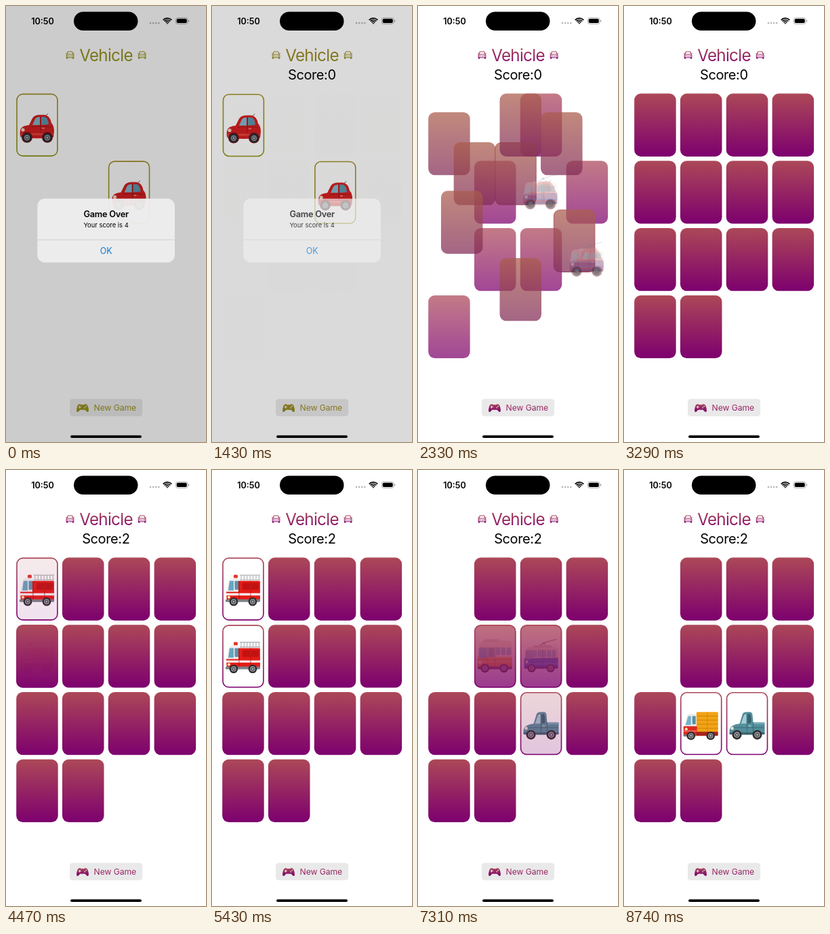
These frames come from a looping animation (295 px wide and 640 px high, 9650 ms). An HTML page with a canvas:

```html
<!DOCTYPE html>
<html lang="en">
<head>
<meta charset="utf-8">
<title>Vehicle memory game</title>
<style>
html, body { margin: 0; width: 100%; height: 100%; overflow: hidden; background: #fff; }
canvas { display: block; width: 295px; height: 640px; }
</style>
</head>
<body>
<canvas id="stage"></canvas>
<script>
const W = 295, H = 640, LOOP = 9650;
const canvas = document.getElementById('stage');
const ctx = canvas.getContext('2d');
const dpr = window.devicePixelRatio || 1;
canvas.width = W * dpr;
canvas.height = H * dpr;

const FONT = 'Inter, Roboto, "Liberation Sans", sans-serif';
const OLIVE = [[165, 144, 40], [140, 150, 22]];
const BERRY = [[172, 72, 88], [125, 0, 110]];
const CARD = { w: 61.5, h: 92.3, r: 9.5 };

const DEAL = 1380, DEAL_TIME = 1455, FLIP = 950;

// Cards carried over to the new game: from column, row to column, row
const MOVES = [
  [0, 1, 0, 0], [3, 0, 1, 0], [1, 1, 3, 0],
  [2, 0, 0, 1], [1, 0, 0, 2], [3, 1, 1, 3]
];
const CAR_MOVES = [[0, 0, 2, 1], [2, 1, 3, 2]];
const ADDED = [[2, 0], [1, 1], [3, 1], [1, 2], [2, 2], [0, 3]];

const FLIPS = {
  '0,0': { art: fireEngine, up: 3720, gone: 5460 },
  '0,1': { art: fireEngine, up: 4400, gone: 5460 },
  '1,1': { art: bus, up: 5460, down: 6655 },
  '2,1': { art: trolley, up: 5805, down: 6655 },
  '2,2': { art: pickup, up: 6655 },
  '1,2': { art: truck, up: 7760 }
};

const lerp = (a, b, p) => a + (b - a) * p;
const ramp = (t, start, len) => {
  const x = Math.min(1, Math.max(0, (t - start) / len));
  return x * x * (3 - 2 * x);
};
const colX = c => 15.2 + c * 67.8;
const rowY = r => 128.6 + r * 98.7;

function gradient(y, h, mix) {
  const g = ctx.createLinearGradient(0, y, 0, y + h);
  for (const i of [0, 1]) {
    const rgb = OLIVE[i].map((v, k) => Math.round(lerp(v, BERRY[i][k], mix)));
    g.addColorStop(i, `rgb(${rgb})`);
  }
  return g;
}

function box(x, y, w, h, r, fill) {
  ctx.beginPath();
  ctx.roundRect(x, y, w, h, r);
  ctx.fillStyle = fill;
  ctx.fill();
}

function poly(fill, ...pts) {
  ctx.beginPath();
  for (let i = 0; i < pts.length; i += 2) ctx.lineTo(pts[i], pts[i + 1]);
  ctx.closePath();
  ctx.fillStyle = fill;
  ctx.fill();
}

function shape(d, fill) {
  ctx.fillStyle = fill;
  ctx.fill(new Path2D(d));
}

function stroke(d, color, width) {
  ctx.strokeStyle = color;
  ctx.lineWidth = width;
  ctx.stroke(new Path2D(d));
}

function dot(x, y, r, fill) {
  ctx.beginPath();
  ctx.arc(x, y, r, 0, Math.PI * 2);
  ctx.fillStyle = fill;
  ctx.fill();
}

function text(str, x, y, size, fill, weight = 400, spacing = 0, align = 'center') {
  ctx.font = `${weight} ${size}px ${FONT}`;
  ctx.letterSpacing = spacing + 'px';
  ctx.textAlign = align;
  ctx.fillStyle = fill;
  ctx.fillText(str, x, y);
}

function faded(alpha, draw) {
  if (alpha <= 0) return;
  ctx.save();
  ctx.globalAlpha *= alpha;
  draw();
  ctx.restore();
}

function at(x, y, draw) {
  ctx.save();
  ctx.translate(x, y);
  draw();
  ctx.restore();
}

// Vehicles, drawn around the middle of a card

function wheels(y, r, ...xs) {
  for (const x of xs) {
    dot(x, y, r, '#2b2b2f');
    dot(x, y, r * 0.62, '#9a9da0');
    dot(x, y, r * 0.42, '#55595d');
    dot(x, y, r * 0.17, '#c9cccd');
  }
}

function redCar() {
  stroke('M12 -13 L16 -17', '#54454a', 1);
  shape('M-25 8 Q-24 1 -12 0 L-7 -10 Q-4 -15 4 -15 L11 -15 Q19 -14 21 -3 Q25 1 25 9 L24 18 Q0 21 -24 18 Q-26 16 -25 8Z', '#d51f20');
  shape('M-7 0 L-3 -9 Q-1 -12 4 -12 L4 0Z', '#86b9cc');
  shape('M6 -12 L11 -12 Q16 -11 17 -1 L6 0Z', '#5f97ad');
  stroke('M5 -13 V15 M-9 3 Q7 0 21 3', '#95151a', 0.8);
  box(-24, 12, 47, 3, 1.5, '#e9453d');
  box(7, 4, 4, 1.2, 0.6, '#eeb0a8');
  dot(-21, 7, 2.6, '#f5d9c4');
  box(-25, 16, 6, 2, 1, '#8d8f92');
  dot(-15, 18, 8, '#7e1218');
  dot(15, 18, 8, '#7e1218');
  wheels(18.5, 6.7, -15, 15);
}

function bus() {
  shape('M-24 -9 Q-24 -23 -15 -23 L20 -23 Q25 -22 25 -15 L25 2 L-26 2Z', '#eee5cc');
  box(-17, -25, 24, 4, 2, '#d9d0b8');
  shape('M-26 1 L25 1 L25 16 Q0 20 -26 16Z', '#f5a623');
  box(-26, 10, 51, 6, 2, '#e88a14');
  box(-24, -13, 12, 16, 2, '#63a8c5');
  box(-10, -13, 9, 14, 1.5, '#599cb9');
  for (const x of [1, 9, 17]) box(x, -13, 6.5, 11, 1, '#6fb2cd');
  stroke('M-11 -14 V15 M0 -14 V15 M-26 5 H25', '#b7730d', 0.8);
  dot(-22, 9, 2.2, '#fff2b8');
  box(-26, 15, 51, 4, 2, '#48484c');
  wheels(17.5, 6.5, -15, 13);
}

function trolley() {
  stroke('M-3 -15 L4 -20 L23 -25', '#6e6a6c', 1.1);
  stroke('M4 -20 L9 -15', '#6e6a6c', 0.8);
  dot(4, -19, 1.7, '#3b98c4');
  shape('M-23 -5 Q-23 -14 -17 -14 L19 -14 Q25 -13 25 -7 L25 5 L-25 5Z', '#e6dfcf');
  box(-12, -16, 28, 3, 1.5, '#cbc4b6');
  shape('M-25 3 L25 2 L25 16 Q0 20 -25 16Z', '#1e62c4');
  box(-25, 10, 50, 2, 1, '#3f8be0');
  box(-23, -9, 9, 13, 2, '#6cabc3');
  for (let x = -12; x < 20; x += 7) box(x, -9, 5.7, 10, 1, '#75b2c7');
  stroke('M-13 -10 V15 M2 -10 V15', '#15498f', 0.7);
  dot(-21, 8, 2, '#fff0c0');
  box(-25, 15, 50, 3, 1.5, '#253a68');
  wheels(17.5, 6, -14, 14);
}

function fireEngine() {
  stroke('M-5 -20.5 H25 M-5 -13.5 H25', '#a2a6aa', 1.2);
  for (let x = -3; x < 25; x += 4.4) stroke(`M${x} -20 V-14`, '#a2a6aa', 1);
  box(-14, -21, 6, 5, 1.5, '#e0382d');
  shape('M-23 -6 Q-21 -16 -17 -16 L-6 -16 L-6 9 L-25 9Z', '#f0f0ef');
  shape('M-22 2 L-20 -12 L-14 -12 L-14 2Z', '#68a5c1');
  box(-12.5, -12, 6, 13, 1, '#5a93ad');
  box(-7, -12, 32, 30, 1.5, '#e51b17');
  shape('M-25 4 L-6 4 L-6 18 L-24 18Z', '#e51b17');
  box(-1, -9, 11, 10, 1, '#c11212');
  box(12, -9, 11, 10, 1, '#c11212');
  box(-25, 6, 50, 3.4, 0, '#f5efee');
  stroke('M-6 -12 V16 M11 -12 V16', '#a01010', 0.7);
  dot(-21, 12, 2, '#ffe7a0');
  box(-26, 15, 51, 4, 1.5, '#7d8286');
  wheels(18.5, 6.3, -14, 14);
}

function pickup() {
  shape('M-26 9 Q-25 2 -11 0 L-7 -13 Q-6 -17 -1 -17 L5 -17 Q8 -16 8 -12 L9 -1 L26 -1 L26 15 Q0 18 -26 15Z', '#548f9c');
  shape('M-9 0 L-5 -11 Q-4 -14 -1 -14 L-1 0Z', '#a6cdd5');
  shape('M1 -14 L4 -14 Q6 -13 6 -1 L1 0Z', '#33616d');
  box(9, -2, 17, 3, 1, '#75acb6');
  stroke('M0 -14 V14 M9 -2 V14 M-24 6 H25', '#33626d', 0.8);
  box(2, 3, 4, 1.2, 0.6, '#c2dde1');
  dot(-22, 7, 2.3, '#e8e1c4');
  box(-26, 13, 52, 3, 1.5, '#3f626b');
  wheels(16.5, 7, -15, 15);
}

function truck() {
  box(-7, -17, 32, 30, 1.5, '#f3a315');
  for (let y = -11; y < 12; y += 6) stroke(`M-6 ${y} H25`, '#c77e0c', 0.9);
  stroke('M9 -17 V13', '#d08a0e', 0.8);
  shape('M-24 3 L-21 -11 Q-20 -14 -17 -14 L-7 -14 L-7 5 L-26 5Z', '#e9eae8');
  shape('M-23 2 L-19 -11 L-15 -11 L-15 2Z', '#74b0c9');
  box(-13, -11, 5, 12, 1, '#568fa8');
  shape('M-26 4 L-6 4 L-6 18 L-26 18Z', '#dc2a21');
  box(-7, 12, 32, 6, 1, '#a9231d');
  box(-26, 10, 20, 2, 1, '#ef6a5c');
  dot(-22, 8, 2, '#fff0bb');
  box(-26, 16, 18, 3, 1, '#74777b');
  wheels(18, 6.2, -15, 14);
}

// Cards

function back(x, y, mix = 1) {
  box(x, y, CARD.w, CARD.h, CARD.r, gradient(y, CARD.h, mix));
}

function face(x, y, mix, fillAlpha = 1) {
  faded(fillAlpha, () => box(x, y, CARD.w, CARD.h, CARD.r, '#fff'));
  ctx.beginPath();
  ctx.roundRect(x + 0.8, y + 0.8, CARD.w - 1.6, CARD.h - 1.6, CARD.r - 0.8);
  ctx.strokeStyle = gradient(y, CARD.h, mix);
  ctx.lineWidth = 1.6;
  ctx.stroke();
}

const inCard = (x, y, art) => at(x + CARD.w / 2, y + CARD.h / 2, art);

function dealing(t) {
  const p = ramp(t, DEAL, DEAL_TIME);
  const q = ramp(t, DEAL, 1000);
  const place = ([c0, r0, c1, r1], k) =>
    [lerp(colX(c0), colX(c1), k), lerp(rowY(r0), rowY(r1), k)];

  for (const [c, r] of ADDED) faded(p, () => back(colX(c), rowY(r)));
  for (const m of CAR_MOVES) {
    const [x, y] = place(m, p);
    faded(1 - p, () => face(x, y, p, 1 - p));
    faded(p, () => back(x, y, p));
  }
  for (const m of MOVES) faded(p, () => back(...place(m, p), p));
  for (const m of CAR_MOVES) {
    const [x, y] = place(m, q);
    faded(1 - p, () => {
      inCard(x, y, redCar);
      faded(p, () => inCard(x, y, trolley));
    });
  }
}

function board(t) {
  for (let i = 0; i < 14; i++) {
    const c = i % 4, r = Math.floor(i / 4), x = colX(c), y = rowY(r);
    const f = FLIPS[`${c},${r}`];
    let up = 0, alpha = 1;
    if (f) {
      up = ramp(t, f.up, FLIP);
      if (f.down) up *= 1 - ramp(t, f.down, FLIP);
      if (f.gone) alpha = 1 - ramp(t, f.gone, 850);
    }
    faded(alpha, () => {
      if (up > 0) {
        face(x, y, 1);
        inCard(x, y, f.art);
      }
      faded(1 - up, () => back(x, y));
    });
  }
}

// Screen furniture

function statusBar() {
  text('10:50', 54, 26.6, 12.6, '#000', 600);
  box(100, 8.5, 94.5, 27.5, 13.75, '#000');
  for (let i = 0; i < 4; i++) dot(213 + i * 4.1, 25, 1.3, '#b5b5b5');
  ctx.lineCap = 'butt';
  for (const r of [3.4, 6, 8.6]) {
    ctx.beginPath();
    ctx.arc(238, 26.5, r, -Math.PI * 0.76, -Math.PI * 0.24);
    ctx.strokeStyle = '#000';
    ctx.lineWidth = 1.7;
    ctx.stroke();
  }
  poly('#000', 236.3, 24.9, 239.7, 24.9, 238, 26.8);
  ctx.beginPath();
  ctx.roundRect(250.4, 17.4, 17.6, 9, 2.8);
  ctx.strokeStyle = '#9c9c9c';
  ctx.lineWidth = 0.8;
  ctx.stroke();
  box(251.7, 18.7, 15, 6.4, 1.8, '#000');
  box(269, 20.4, 1.2, 3, 0.6, '#9c9c9c');
  box(95, 630.2, 105, 3.8, 1.9, '#000');
}

function carIcon(x, ink) {
  at(x, 72, () => {
    stroke('M-4.8 -1 L-3.3 -4.4 Q-3 -5 -2.3 -5 H2.3 Q3 -5 3.3 -4.4 L4.8 -1', ink, 1.1);
    ctx.beginPath();
    ctx.roundRect(-5.4, -1, 10.8, 4.8, 1.5);
    ctx.stroke();
    box(-5.8, 3.2, 2.6, 2.3, 0.7, ink);
    box(3.2, 3.2, 2.6, 2.3, 0.7, ink);
    dot(-3.2, 1.3, 0.9, ink);
    dot(3.2, 1.3, 0.9, ink);
    box(-1.6, 0.9, 3.2, 0.9, 0.4, ink);
    stroke('M-6.4 -2.6 L-5 -1.8 M6.4 -2.6 L5 -1.8', ink, 0.9);
  });
}

function gamepad(ink, hole) {
  at(113, 590, () => {
    shape('M-5 -5.6 Q-3.4 -6 -2.4 -4.8 H2.4 Q3.4 -6 5 -5.6 Q7.4 -5 8.4 -0.5 Q9.6 4.6 8.2 5.8 Q6.8 6.5 5 4.2 Q3.8 2.8 2.8 2.8 H-2.8 Q-3.8 2.8 -5 4.2 Q-6.8 6.5 -8.2 5.8 Q-9.6 4.6 -8.4 -0.5 Q-7.4 -5 -5 -5.6Z', ink);
    stroke('M-6.3 -1.3 H-2.3 M-4.3 -3.3 V0.7', hole, 1.1);
    dot(3.2, -0.4, 0.85, hole);
    dot(5.2, -2.4, 0.85, hole);
  });
}

function header(t, mix) {
  const ink = gradient(62, 24, mix);
  text('Vehicle', 147.5, 81, 24.2, ink, 400, -0.7);
  const iconInk = gradient(-6, 12, mix);
  carIcon(94.5, iconInk);
  carIcon(200.7, iconInk);
  if (t >= DEAL) text('Score:' + (t < 4400 ? 0 : 2), 147.3, 107.8, 20, '#000', 400, -0.4);
}

function button(mix) {
  box(94, 576.8, 107.2, 25.4, 4.5, '#e9e9ea');
  gamepad(gradient(-6, 12, mix), '#e9e9ea');
  text('New Game', 129.6, 594.3, 12.2, gradient(584, 14, mix), 400, -0.1, 'left');
}

function alertBox() {
  box(46.3, 282.8, 202.6, 93.6, 10.5, 'rgba(240,239,239,0.95)');
  text('Game Over', 147.6, 310, 12.7, '#000', 600, -0.25);
  text('Your score is 4', 147.6, 324.8, 9.4, '#000');
  box(46.3, 342.8, 202.6, 0.7, 0, '#c6c6c8');
  text('OK', 147.6, 364, 12.4, '#087bd8');
}

function render(t) {
  ctx.setTransform(dpr, 0, 0, dpr, 0, 0);
  ctx.fillStyle = '#fff';
  ctx.fillRect(0, 0, W, H);
  const mix = ramp(t, DEAL, 300);
  header(t, mix);
  button(mix);
  if (t < DEAL + DEAL_TIME) dealing(t);
  else board(t);
  statusBar();
  faded(1 - ramp(t, 1320, 320), () => {
    ctx.fillStyle = 'rgba(0,0,0,0.2)';
    ctx.fillRect(0, 0, W, H);
    alertBox();
  });
}

const begin = performance.now();
function tick() {
  render((performance.now() - begin) % LOOP);
  requestAnimationFrame(tick);
}
tick();
</script>
</body>
</html>
```
